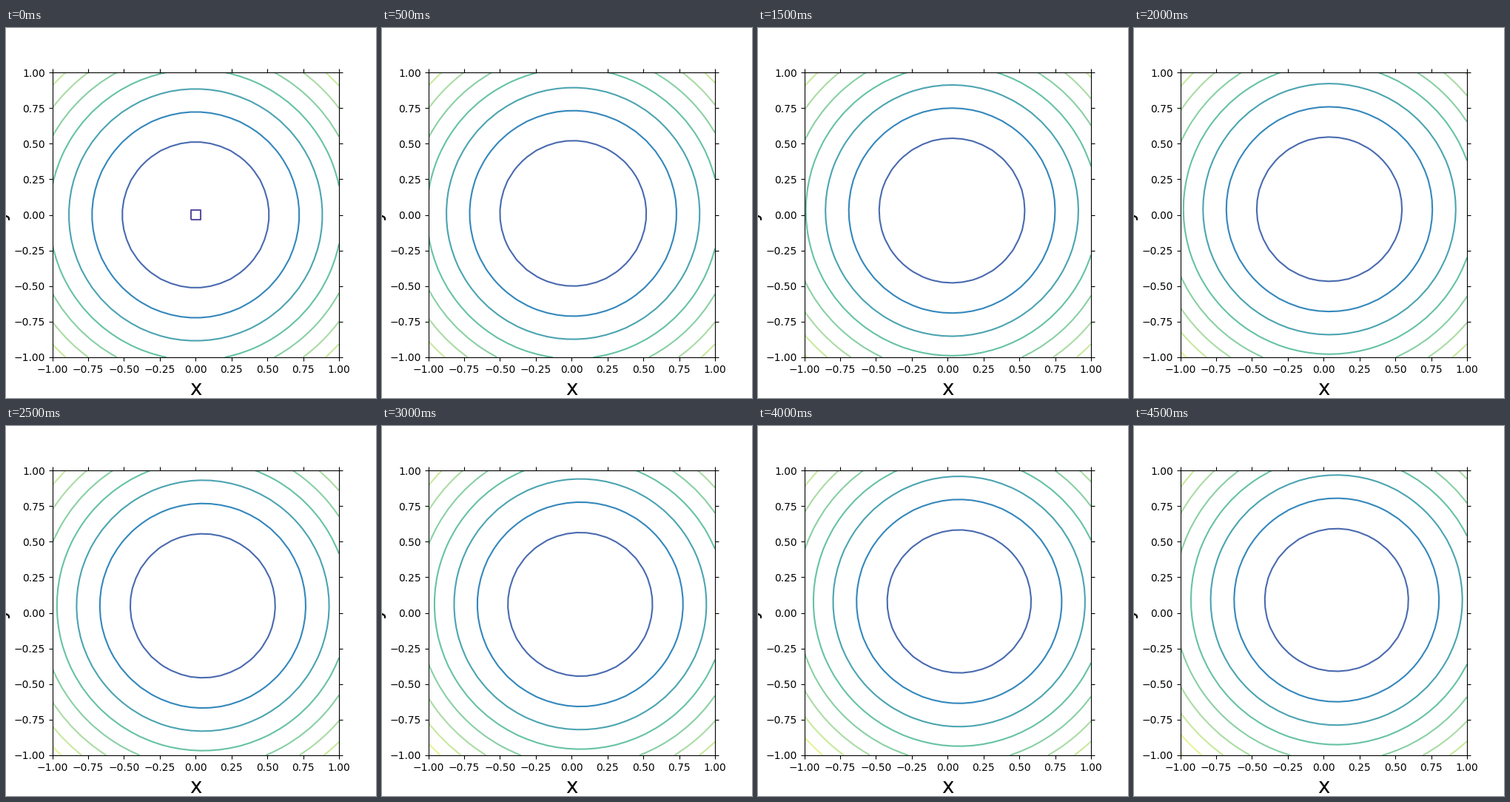
Recreate the animation shown at these times as a matplotlib script. Size 500 px wide and 500 px high, loop 5000 ms.

```python
import numpy as np
import matplotlib.pyplot as plt
from matplotlib.animation import FuncAnimation

FRAMES = 10
INTERVAL = 500
DRIFT = 0.01    # shift of the bowl's centre per frame
LIFT = 0.0012   # rise of the bowl's bottom per frame
STEP = 0.26     # distance between contour levels

axis = np.linspace(-1, 1, 30)
X, Y = np.meshgrid(axis, axis)


def bowl(i):
    c = DRIFT * i
    return (X - c) ** 2 + (Y - c) ** 2 + LIFT * i


# The lowest level touches the four innermost grid points of the first bowl.
levels = bowl(0).min() + 1e-9 + STEP * np.arange(21)

fig, ax = plt.subplots(figsize=(5, 5), dpi=100)
fig.subplots_adjust(left=0.125, right=0.9, bottom=0.11, top=0.88)
ticks = np.linspace(-1, 1, 9)
ax.set(xlim=(-1, 1), ylim=(-1, 1), xticks=ticks, yticks=ticks)
ax.tick_params(top=True, right=True)
ax.set_xlabel("x", fontsize=20)
ax.set_ylabel("y", fontsize=20)

shown = []


def clear():
    while shown:
        shown.pop().remove()
    return []


def draw(i):
    clear()
    z = bowl(i)
    visible = levels[(levels > z.min()) & (levels < z.max())]
    rings = ax.contour(X, Y, z, levels=visible, cmap="Spectral_r",
                       vmin=levels[0], vmax=levels[-1], linewidths=1.5)
    shown.append(rings)
    return [rings]


anim = FuncAnimation(fig, draw, frames=FRAMES, init_func=clear,
                     interval=INTERVAL, repeat=True, repeat_delay=0)
plt.show()
```
